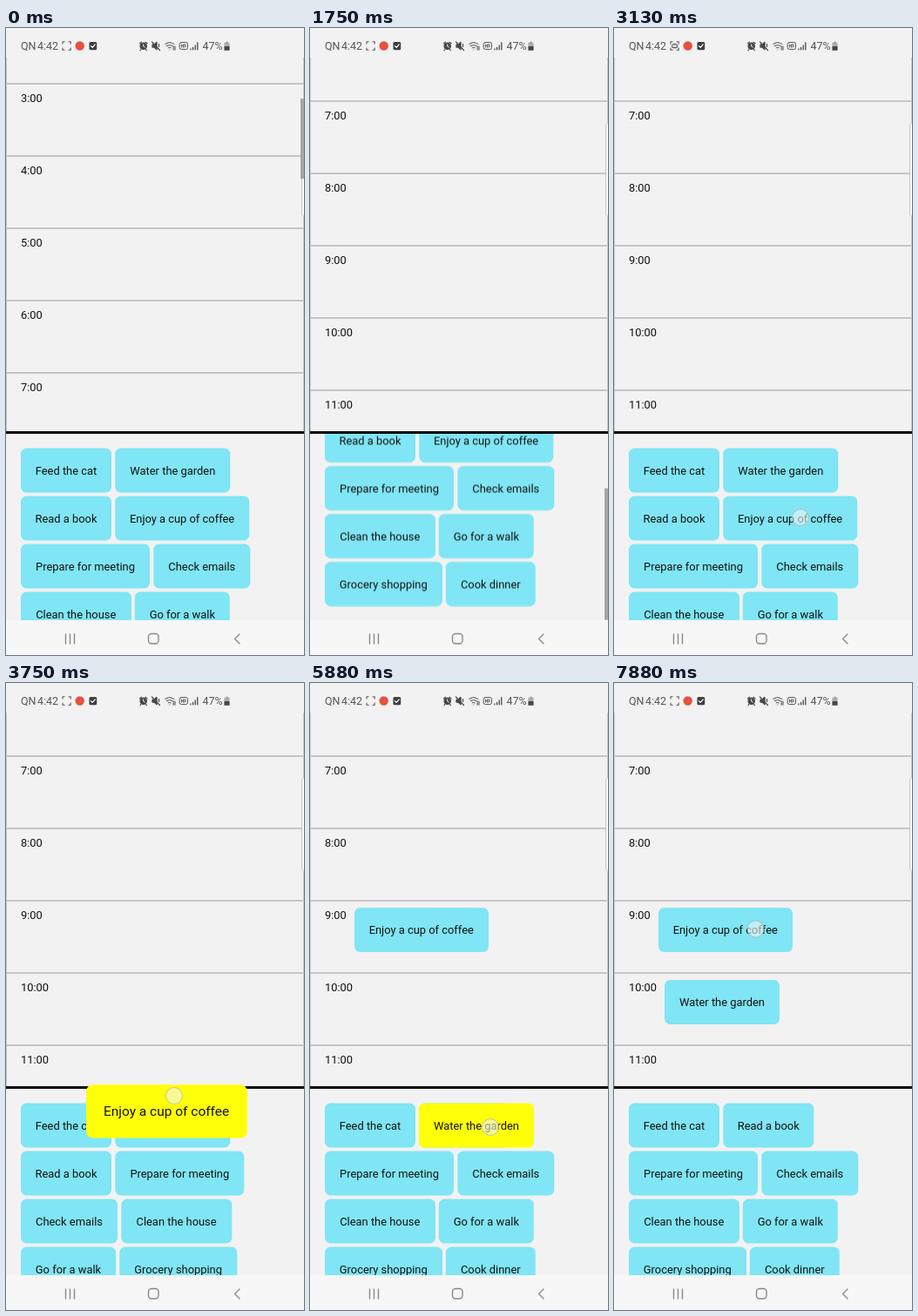
An HTML page that plays this animation: 342x720 px, repeating every 8000 ms.

```html
<!DOCTYPE html>
<html lang="en">
<head>
<meta charset="utf-8">
<title>Day planner</title>
<style>
html, body { margin: 0; width: 100%; height: 100%; overflow: hidden; background: #f2f2f2; }
body { position: relative; font: 12.9px Roboto, Arial, sans-serif; color: #111; }
div { position: absolute; box-sizing: border-box; }
#day { left: 0; top: 34px; width: 342px; height: 429px; overflow: hidden; }
#rows, #list { left: 0; top: 0; width: 342px; will-change: transform; }
.row { left: 0; width: 342px; height: 83px; border: 1px solid #c6c6c6; padding: 6px 0 0 16px; line-height: 20px; }
.row.over { background: #c3c3c3; }
#tray { left: 0; top: 466px; width: 342px; height: 214px; overflow: hidden; }
#rule { left: 0; top: 463px; width: 342px; height: 3px; background: #0a0508; }
.card { height: 50.5px; border-radius: 6.5px; background: #80e5f4; display: flex; align-items: center; justify-content: center; white-space: pre; }
#held { background: #ffff0a; left: 0; top: 0; }
.thumb { left: 338px; width: 4px; background: #a6a6a6; }
#handle { left: 339px; top: 108px; width: 8px; height: 109px; border: 1px solid #c8c8c8; border-radius: 4px; background: #f8f8f8; }
#dot { left: -10px; top: -10px; width: 20px; height: 20px; border-radius: 50%; background: rgba(240,246,244,.6); border: 1.5px solid rgba(125,140,135,.42); }
#bars { position: absolute; left: 0; top: 0; }
</style>
</head>
<body>
<div id="day"><div id="rows"></div></div>
<div id="tray"><div id="list"></div></div>
<div id="rule"></div>
<div id="handle"></div>
<div class="thumb" id="dayThumb" style="height:92px"></div>
<div class="thumb" id="trayThumb" style="height:151px"></div>
<div class="card" id="held"></div>
<svg id="bars" width="342" height="720" fill="none" stroke-linecap="round" stroke-linejoin="round">
  <rect y="680" width="342" height="40" fill="#f7f7f7"/>
  <g fill="#555" font-family="Roboto, Arial, sans-serif" font-size="12.5">
    <text x="17" y="25">QN</text>
    <text x="36" y="25">4:42</text>
    <text x="225.5" y="25">47%</text>
  </g>
  <g stroke="#555" stroke-width="1.1">
    <path d="M65 18v-2.2h2.2M72 15.800h2.200v2.200M74.200 23v2.200h-2.200M67.200 25.200h-2.200v-2.200"/>
    <g id="lens"><rect x="66.800" y="18.800" width="5.700" height="3.800" rx="1"/><path d="M68.800 18.300h1.700M69.600 20.700h.1"/></g>
  </g>
  <circle cx="84.700" cy="20.500" r="5.200" fill="#e8503f"/>
  <rect x="95.500" y="16" width="8.700" height="9.200" rx="1.500" fill="#3f3f3f"/>
  <path d="M97.500 20.600l1.700 1.800 3-3.600" stroke="#fff" stroke-width="1.200"/>
  <g stroke="#484848" stroke-width="1.200">
    <circle cx="157.700" cy="20.800" r="3.700" fill="#484848"/>
    <path d="M153.500 17.800l2-1.700M162 17.800l-2-1.700M154.800 24.600l-.8 1M160.600 24.600l.8 1"/>
    <path d="M157.700 18.800v2.200l1.500 1" stroke="#f2f2f2" stroke-width="1"/>
    <path d="M168 19h2l3-2.700v8.500l-3-2.700h-2z" fill="#484848"/>
    <path d="M167.500 16l9 9.500M175.500 18.500v3"/>
    <path d="M182.500 18.500q5-4 10.500 0M184.300 20.700q3.500-2.600 7 0M186.200 22.800q1.600-1.200 3.200 0M187.800 25h.1M192.200 21v4.200M194 21v4.200" stroke-width="1"/>
    <rect x="199.200" y="16.500" width="9.300" height="8" rx="2" stroke-width=".9"/>
    <path d="M201.500 18.800v3.500M203.500 18.800v3.500M201.500 20.500h2M205.200 18.800v3.500q2.500-1.700 0-3.500" stroke-width=".8"/>
    <path d="M212 24.800v-.8M214.600 24.800v-2.500M217.200 24.800v-5M219.800 24.800v-8.200" stroke-width="1.300"/>
  </g>
  <path d="M252.200 15.500h2.600v1.200h1.700v9h-6v-9h1.700z" fill="#aaa"/>
  <path d="M250.500 21h6v4.700h-6z" fill="#484848"/>
  <g stroke="#898989" stroke-width="1.400">
    <path d="M68.500 696v11M73.500 696v11M78.500 696v11"/>
    <rect x="163.500" y="695.500" width="11.500" height="11.500" rx="3.500"/>
    <path d="M268 696l-5.500 5.500 5.500 5.500"/>
  </g>
</svg>
<div id="dot"></div>
<script>
const LOOP = 8000, ROW = 83;
const $ = id => document.getElementById(id);
const tasks = [
  ["Feed the cat", 104], ["Water the garden", 132], ["Read a book", 104],
  ["Enjoy a cup of coffee", 153.5], ["Prepare for meeting", 148], ["Check emails", 111],
  ["Clean the house", 126.5], ["Go for a walk", 109], ["Grocery shopping", 134.5], ["Cook dinner", 103]
];
// finger paths: [time, x, y]
const drags = [
  { task: 3, press: 2750, grab: 3250, grow: 3320, drop: 4750, hour: 9, left: 51, dx: -12, home: [201.5, 562.8],
    path: [[3250, 214, 562], [3500, 206, 535], [3750, 193, 474], [3950, 192, 477], [4130, 192, 475], [4430, 186, 296]] },
  { task: 1, press: 5380, grab: 5880, grow: 5980, drop: 6630, hour: 10, left: 58, dx: -16, home: [191, 507.8],
    path: [[5380, 222, 510], [5870, 222, 510], [5880, 207, 510], [6000, 207, 510], [6130, 203, 480], [6420, 188, 371]] }
];

const clamp = v => Math.max(0, Math.min(1, v));
const part = (t, a, b) => clamp((t - a) / (b - a));
const easeOut = p => 1 - (1 - p) ** 3;
const smooth = p => p * p * (3 - 2 * p);
const move = (el, x, y, more = "") => { el.style.transform = `translate(${x}px,${y}px)${more}`; };
const show = (el, on) => { el.style.visibility = on ? "visible" : "hidden"; };

function along(path, t) {
  let i = 1;
  while (i < path.length - 1 && t > path[i][0]) i++;
  const a = path[i - 1], b = path[i], p = part(t, a[0], b[0]);
  return [a[1] + (b[1] - a[1]) * p, a[2] + (b[2] - a[2]) * p];
}

function add(parent, cls, text) {
  const el = document.createElement("div");
  el.className = cls;
  el.textContent = text;
  parent.append(el);
  return el;
}

const rows = Array.from({ length: 24 }, (_, h) => {
  const el = add($("rows"), "row", h + ":00");
  el.style.top = h * ROW + "px";
  return el;
});
const cards = tasks.map(([text, width]) => {
  const el = add($("list"), "card", text);
  el.style.width = width + "px";
  return el;
});
for (const d of drags) {
  d.placed = add($("rows"), "card", tasks[d.task][0]);
  d.placed.style.width = tasks[d.task][1] + "px";
  d.placed.style.left = d.left + "px";
  d.placed.style.top = d.hour * ROW + 8 + "px";
}

// wrap the remaining cards into lines
function flow(gone) {
  let x = 17, y = 16.5;
  cards.forEach((el, i) => {
    show(el, !gone.includes(i));
    if (gone.includes(i)) return;
    const w = tasks[i][1];
    if (x + w > 326) { x = 17; y += 55; }
    move(el, x, y);
    x += w + 4.3;
  });
}

function draw(t) {
  const scroll = 219 + 312 * easeOut(part(t, 130, 500));
  move($("rows"), 0, -scroll);
  move($("dayThumb"), 0, 34 + scroll * 0.215);
  $("dayThumb").style.opacity = 1 - part(t, 680, 880);

  const slide = 89.5 * (smooth(part(t, 600, 900)) - smooth(part(t, 1850, 2250)));
  move($("list"), 0, -slide);
  move($("trayThumb"), 0, 466 + slide * 0.7);
  $("trayThumb").style.opacity = part(t, 600, 680) - part(t, 2500, 2750);

  flow(drags.filter(d => t >= d.grab).map(d => d.task));

  let finger = t >= 7630 ? [162.5, 282.5] : null, over = -1, held = null;
  for (const d of drags) {
    show(d.placed, t >= d.drop);
    if (t < d.press || t >= d.drop) continue;
    finger = along(d.path, t);
    if (t < d.grab) continue;
    held = d;
    if (finger[1] < 463) over = Math.floor((finger[1] - 34 + scroll) / ROW);
  }
  rows.forEach((el, h) => el.classList.toggle("over", h === over));

  show($("held"), held);
  if (held) {
    const [text, w] = tasks[held.task];
    const late = along(held.path, Math.max(held.grab, t - 70));
    const start = held.path.find(p => p[0] === held.grab);
    const x = held.home[0] + late[0] - start[1];
    const y = held.home[1] + late[1] - start[2];
    if ($("held").textContent !== text) $("held").textContent = text;
    $("held").style.width = w + "px";
    move($("held"), x - w / 2, y - 25.25, ` scale(${1 + 0.2 * smooth(part(t, held.grow, held.grow + 180))})`);
  }

  show($("dot"), finger);
  if (finger) move($("dot"), ...finger);

  // recording light blinks once a second
  const blink = t < 4800 ? t - 130 : t;
  show($("lens"), blink >= 0 && blink % 1000 < 500);
}

const begin = performance.now();
function tick() {
  draw((performance.now() - begin) % LOOP);
  requestAnimationFrame(tick);
}
tick();
</script>
</body>
</html>
```
